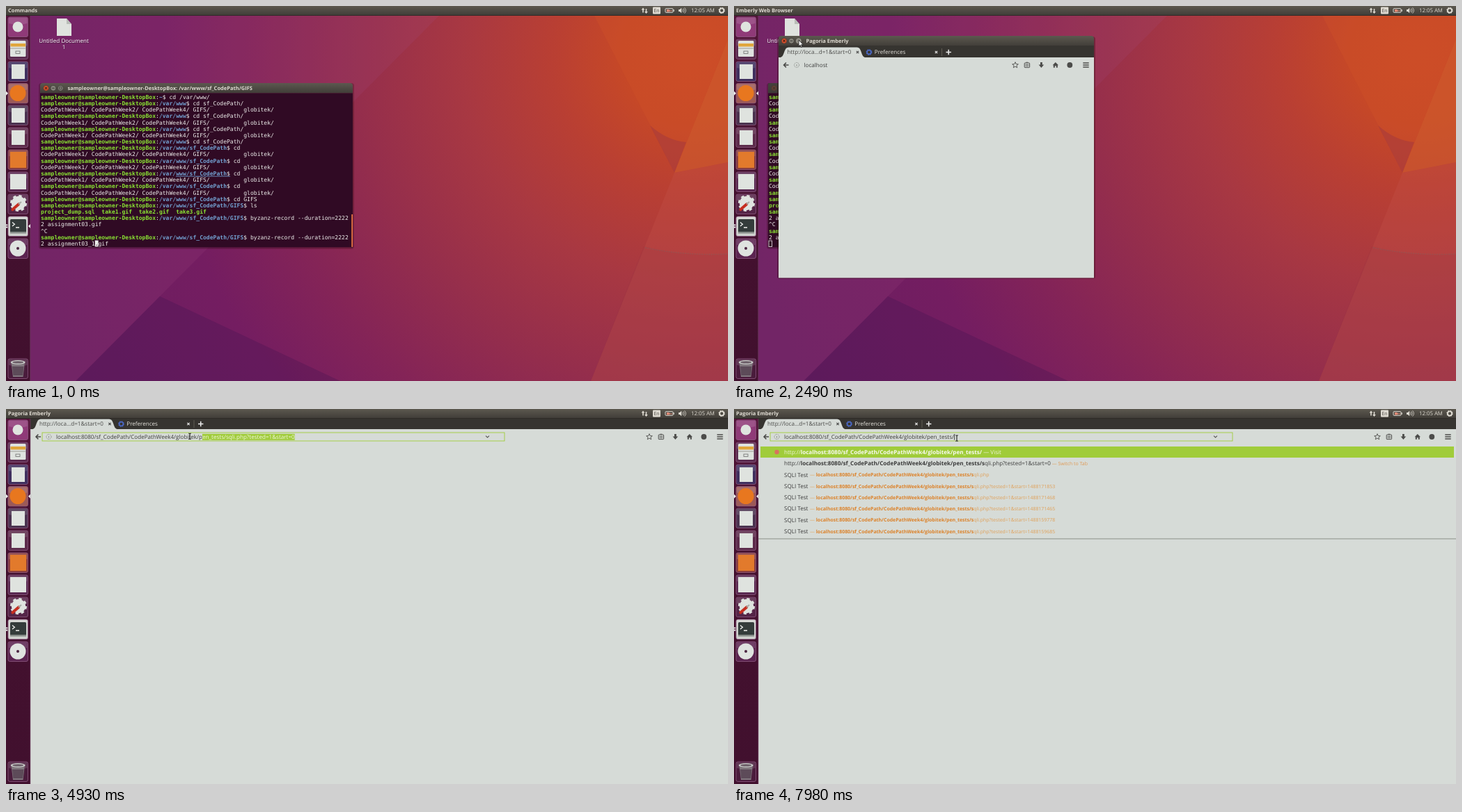
Write an HTML page that moves like this. It is 1037x540 px and loops after 8 s.

```html
<!DOCTYPE html>
<html lang="en">
<head>
<meta charset="utf-8">
<title>Desktop session</title>
<style>
html, body { margin: 0; width: 100%; height: 100%; overflow: hidden; background: #42102f; }
svg { display: block; width: 1037px; height: 540px; }
text { font: 8.08px "Open Sans", "Noto Sans", sans-serif; white-space: pre; text-rendering: geometricPrecision; }
.mono { font: 8.07px "DejaVu Sans Mono", monospace; fill: #eeeeec; }
.b { font-weight: bold; }
.title { font-weight: bold; font-size: 7.5px; fill: #dfdbd2; }
.grn { fill: #8ae234; font-weight: bold; }
.blu { fill: #729fcf; font-weight: bold; }
.small { font-size: 6.93px; }
</style>
</head>
<body>
<svg id="stage" viewBox="0 0 1037 540" xmlns="http://www.w3.org/2000/svg"></svg>
<script>
const LOOP = 8000, COL = 4.858, ROW = 9.175;
const PAPER = '#d6dbd7', INK = '#3c3c3c', LIME = '#a0cc3a';
const OWNER = 'sampleowner', HOST = OWNER + '-DesktopBox';
const SITE = 'localhost:8080/sf_CodePath/CodePathWeek4/globitek/pen_tests/';
const PAGE = 'sqli.php?tested=1&start=0';
const URL_TEXT = SITE + PAGE;

// ---- drawing helpers
const esc = s => s.replace(/&/g, '&amp;').replace(/</g, '&lt;');
const rect = (x, y, w, h, fill, more = '') => `<rect x="${x}" y="${y}" width="${w}" height="${h}" fill="${fill}" ${more}/>`;
const disc = (x, y, r, fill, more = '') => `<circle cx="${x}" cy="${y}" r="${r}" fill="${fill}" ${more}/>`;
const shape = (d, fill, more = '') => `<path d="${d}" fill="${fill}" ${more}/>`;
const line = (d, color, w = 1, more = '') => `<path d="${d}" fill="none" stroke="${color}" stroke-width="${w}" ${more}/>`;
const label = (x, y, s, fill = INK, more = '') => `<text x="${x}" y="${y + 2.8}" fill="${fill}" ${more}>${esc(s)}</text>`;
const span = (s, more = '') => `<tspan ${more}>${esc(s)}</tspan>`;
const group = (id, body, more = '') => `<g id="${id}" ${more}>${body}</g>`;
const gradient = (id, stops, more) => {
  const kind = more.includes('r=') ? 'radialGradient' : 'linearGradient';
  return `<${kind} id="${id}" ${more}>` +
    stops.map(([o, c]) => `<stop offset="${o}" stop-color="${c}"/>`).join('') + `</${kind}>`;
};
const gear = (x, y, r, color) =>
  disc(x, y, r * .72, 'none', `stroke="${color}" stroke-width="${r * .42}"`) +
  disc(x, y, r * .9, 'none', `stroke="${color}" stroke-width="${r * .4}" stroke-dasharray="${r * .36} ${r * .347}"`);
const cross = (x, y, color) => line(`M${x - 1.7} ${y - 1.7}l3.4 3.4m0 -3.4l-3.4 3.4`, color, 1.1);

// ---- desktop
function wallpaper() {
  return rect(0, 0, 1037, 540, 'url(#wall)') +
    shape('M35 14H622L100 540H35Z', '#a04a86', 'opacity=".16"') +
    shape('M221 418L100 540H480Z', '#2f1048', 'opacity=".22"') +
    shape('M845 14L960 240L1037 48V14Z', '#d2552a', 'opacity=".3"') +
    shape('M1037 48L960 240L1037 225Z', '#d2602f', 'opacity=".5"') +
    shape('M925 172Q950 194 977 196L960 240Z', '#8c2c4c', 'opacity=".32"') +
    shape('M960 240L1037 225V540H840Z', '#c05048', 'opacity=".34"') +
    shape('M916 346Q975 362 1037 357V540H840Z', '#8f3448', 'opacity=".16"') +
    line('M918 348Q975 360 1037 357', '#8d5a58', 1.6, 'stroke-dasharray="2 1.4" opacity=".55"') +
    shape('M73 18H87L94 26V43H73Z', '#dfe2de') + shape('M87 18V26H94Z', '#b9bdb8') +
    [['Untitled Document', 50], ['1', 59]].map(([s, y]) =>
      label(83.5, y + .7, s, '#2a0a26', 'text-anchor="middle" opacity=".7"') +
      label(83, y, s, '#fff', 'text-anchor="middle"')).join('');
}

function panel() {
  const c = '#dfdbd2';
  return rect(0, 0, 1037, 13.5, 'url(#bar)') + rect(0, 13, 1037, 1, '#2e2a27') +
    `<text id="app" class="title" x="3" y="9.2"></text>` +
    shape('M915 2.5l2.4 3h-1.6v4h-1.6v-4h-1.6zM919.5 11l2.4-3h-1.6v-4h-1.6v4h-1.6z', c) +
    rect(929, 1.5, 11, 10, c, 'rx="1"') + label(930.5, 6.5, 'En', '#4a4640', 'style="font-size:6.8px"') +
    rect(947, 3.7, 11, 5.6, 'none', `stroke="${c}" stroke-width="1" rx="1"`) + rect(958.4, 5.2, 1.4, 2.6, c) +
    shape('M949 5h3l2 1.5h3v1h-3l-2 1h-3z', '#e08a76') +
    shape('M966 5h1.8l2.4-2.2v7.4l-2.4-2.2h-1.8z', c) +
    line('M971.5 4.6q1.6 1.9 0 3.8M973 3.4q2.8 3.1 0 6.2M974.6 2.4q3.8 4.1 0 8.2', c, .8) +
    label(984, 6.5, '12:05 AM', c, 'style="font-size:7.8px"') + gear(1028, 6.5, 4.2, c);
}

const tile = (y, fill, body) =>
  rect(3, y - 14, 28.5, 28.5, fill, 'rx="2.5" stroke="#8d5a80" stroke-width=".8"') +
  shape(`M4 ${y - 13}H30.5V${y - 5}Q17 ${y - 1} 4 ${y - 5}Z`, '#fff', 'opacity=".13"') + body;

function launcher() {
  const w = '#dfe3df';
  const page = y => rect(8, y - 10, 19, 21, w);
  return rect(0, 14, 35, 526, 'url(#dock)') + rect(34.4, 14, .8, 526, '#6b3a5c') +
    tile(30, '#8f3a78', disc(17, 30, 7.5, w)) +
    tile(62, '#5b2c50', rect(6, 50, 22.5, 23, w, 'rx="1.5"') + rect(6.5, 54, 21.5, 4.5, '#e0a63c') +
      line('M6 61H28.5', '#8a8a84', .8) + rect(14, 65, 6, 3.4, 'none', 'stroke="#777" stroke-width=".9"')) +
    tile(94, '#40305f', page(94)) +
    tile(125.5, '#9c5a58', disc(17, 125.5, 11.5, '#e8771f')) +
    tile(157, '#4b3350', page(157)) +
    tile(189, '#5d2c4c', page(189)) +
    tile(221, '#8a3f3e', rect(6, 210, 23, 23, '#e27a2c')) +
    tile(253, '#5a2a52', rect(6, 242, 23, 22, w)) +
    tile(285, '#552548', disc(18, 284, 7, w) + gear(18, 284, 11, w) +
      line('M9.5 293L18 285.5', '#c62e20', 4.2, 'stroke-linecap="round"') +
      line('M18 285.5l4-3.5', '#a9aaa6', 2)) +
    tile(317, '#cfd2ce', rect(6, 307, 23, 20, '#343c3b', 'rx="1.5"') +
      rect(6, 325, 23, 2.5, '#858b87') + line('M9 311.5l3.4 2.8l-3.4 2.8M14 319H19', '#f2f2f0', 1.3)) +
    tile(349, '#5b2450', disc(17, 349, 11.5, w) + disc(17, 349, 2, '#4a2440')) +
    tile(522, '#4a1c3c', shape('M7.5 513H27L24.5 534H10Z', '#82787f') + shape('M9 519H25.5L24.2 532H10.4Z', '#5d4b59') +
      `<ellipse cx="17.2" cy="513" rx="10.5" ry="3" fill="#cdd0cc"/>` +
      `<ellipse cx="17.2" cy="513" rx="8" ry="1.7" fill="#6d5f69"/>`) +
    shape('M0 122.7L3 125.7L0 128.7Z', '#eee') +
    shape('M0 314.5h2.4v1.8H0zM0 317.6h2.4v1.8H0z', '#eee') +
    `<path id="active" fill="#eee"/>`;
}

const buttons = (x, y) => disc(x, y, 4, '#e0542f', 'stroke="#3a3733" stroke-width=".8"') + cross(x, y, '#5f2312') +
  [10.4, 20.8].map(d => disc(x + d, y, 4, '#85837a', 'stroke="#3a3733" stroke-width=".8"')).join('') +
  line(`M${x + 8.6} ${y}h3.6`, '#3c3b37', 1) +
  rect(x + 19.2, y - 1.6, 3.2, 3.2, 'none', 'stroke="#3c3b37" stroke-width=".8"');

// ---- console window
function consoleRows() {
  const www = '/var/www', site = www + '/sf_CodePath', gifs = site + '/GIFS';
  const prompt = (dir, cmd) => span(`${OWNER}@${HOST}`, 'class="grn"') + span(':') + span(dir, 'class="blu"') + span('$ ' + cmd);
  const names = span('CodePathWeek1/ CodePathWeek2/ CodePathWeek4/ GIFS/          globitek/');
  const up = prompt(www, 'cd sf_CodePath/'), cd = prompt(site, 'cd');
  const rec = prompt(gifs, 'byzanz-record --duration=2222');
  return [prompt('~', 'cd /var/www/'), up, names, up, names, up, names, up,
    cd, names, cd, names, cd, names, cd, names, prompt(site, 'cd GIFS'), prompt(gifs, 'ls'),
    span('project_dump.sql  take1.gif  take2.gif  take3.gif', 'class="grn"'),
    rec, span('2 assignment03.gif'), span('^C'), rec, span('2 assignment03_1.gif')];
}

function consoleWindow() {
  const rows = consoleRows().map((r, i) =>
    `<text class="mono" x="50" y="${(133.9 + i * ROW).toFixed(2)}">${r}</text>`).join('');
  const cx = 50 + 16 * COL;
  return rect(47, 111, 453, 239, '#200', 'opacity=".25" rx="4"') +
    shape('M49 125.5V115Q49 111 53 111H494Q498 111 498 115V125.5Z', 'url(#bar)') +
    buttons(57.5, 118.3) + label(88.5, 118.3, `${OWNER}@${HOST}: /var/www/sf_CodePath/GIFS`, '#dfdbd2', 'class="title"') +
    group('dim', rect(49, 111, 449, 14.5, '#3c3a36', 'opacity=".75"')) +
    rect(49, 125.5, 449, 222, '#300a24') + rect(496.2, 300, 1.8, 47, '#e0703f') +
    `<g clip-path="url(#view)">` + group('rows', rows) + '</g>' +
    group('typed', rect(cx, 337.5, COL, 9, '#eeeeec') +
      `<text class="mono" x="${cx}" y="344.9" style="fill:#300a24">.</text>` + line('M244 245.3H322', '#729fcf', .8)) +
    rect(50, 338, 4.4, 8.6, '#eeeeec', 'id="block" stroke="#eeeeec" stroke-width=".8"');
}

// ---- browser window, laid out for the maximised position
function browser() {
  const frame = rect(62, 44, 457, 349, '#200', 'opacity=".3" rx="4"') +
    shape('M64 58V47Q64 43 68 43H513Q517 43 517 47V58Z', 'url(#bar)') + buttons(72, 50.2) +
    disc(92.8, 50.2, 4, '#b5b3a8', 'id="hot" opacity=".5"') +
    label(103.5, 50.2, 'Pagoria Emberly', '#dfdbd2', 'class="title"');
  const left = shape('M37 29.2C45 29.2 42 14.5 50 14.5H148C156 14.5 153 29.2 161 29.2Z', PAPER) +
    label(48, 21.3, 'http://loca…d=1&start=0', '#4a4a48') + cross(149, 21.5, '#444') +
    gear(165.5, 21.5, 4, '#4a66c0') + label(173.3, 21.3, 'Preferences', '#e4e2dc') + cross(262, 21.5, '#eee') +
    line('M270 16V27', '#6a675f', .8) + line('M276 21.5h7.4M279.7 17.8v7.4', '#eee', 1.5) +
    line('M50 40H43.4M46.4 36.6L43 40L46.4 43.4', '#4a4a48', 1.5) +
    disc(61.5, 40, 3.5, 'none', 'stroke="#8a8d88" stroke-width=".9" stroke-dasharray="1.6 .9"') + rect(61, 39, 1, 2.6, '#8a8d88') +
    group('focus', rect(52, 34, 664, 12, 'none', `stroke="${LIME}" stroke-width=".9"`) +
      line('M689 38.6l2.5 2.3l2.5-2.3', '#555', 1.1)) +
    rect(0, 35.8, 0, 9, LIME, 'id="sel"') +
    `<text id="url" x="72" y="42.9" fill="${INK}"><tspan id="head"></tspan><tspan id="tail" fill="#f4f8e6"></tspan></text>` +
    rect(0, 36, .8, 8.6, '#222', 'id="caret"');
  const dark = '#4c4c4a';
  const right = shape('M924 35.7l1.2 2.9 3.1.2-2.4 2 .8 3-2.7-1.7-2.7 1.7.8-3-2.4-2 3.1-.2z', 'none', `stroke="${dark}" stroke-width=".9"`) +
    rect(937.2, 37, 7.4, 6.6, 'none', `stroke="${dark}" stroke-width="1" rx=".8"`) +
    line('M939.4 36.2h3M938.5 39.4h4.8M938.5 41.4h4.8', dark, .9) +
    shape('M960 36h2.8v3.4h2.4L961.4 44l-3.8-4.6h2.4z', dark) +
    shape('M977.6 40.3l4.2-4.2 4.2 4.2h-1.2v3.5h-2v-2.5h-2v2.5h-2v-3.5z', dark) +
    disc(1002.3, 40, 3.9, dark) + line('M1021.3 37h8.4M1021.3 40h8.4M1021.3 43h8.4', dark, 1.6);
  return group('frame', frame) + rect(0, 0, 0, 0, '#363430', 'id="strip"') + rect(0, 0, 0, 0, PAPER, 'id="page"') +
    group('left', left) + group('right', right);
}

function popup() {
  const rowY = i => 62.3 + i * 16.25;
  const stamps = [, 1488171853, 1488171468, 1488171465, 1488159778, 1488159685];
  const visits = Array.from({ length: 6 }, (_, i) => {
    const query = i ? '?tested=1&start=' + stamps[i] : '';
    const body = label(72, rowY(i + 2), 'SQLI Test') +
      `<text class="small" x="109" y="${rowY(i + 2) + 2.6}" fill="#e0a058">— ` +
      span(SITE + 's', 'class="b small" fill="#dc8128"') + span('qli.php' + query) + '</text>';
    return i < 4 ? body : group('late' + i, body);
  }).join('');
  return rect(35, 49, 1002, 0, PAPER, 'id="sheet"') + rect(35, 0, 1002, .9, '#83877f', 'id="edge"') +
    rect(38, 54, 996, 16, LIME) + disc(61.5, 62, 3.2, '#d8735e') +
    `<text x="72" y="65.1" fill="#eef3dc">http://<tspan id="visit" class="b" fill="#f8faf0"></tspan> — Visit</text>` +
    `<text x="72" y="81.4" fill="${INK}">http://` + span(SITE + 's', 'class="b"') + span(PAGE.slice(1)) +
    span(' — Switch to Tab', 'class="small" fill="#e09a55"') + '</text>' + visits;
}

const stage = document.getElementById('stage');
stage.innerHTML = '<defs>' +
  gradient('wall', [[0, '#ca4a27'], [.1, '#c64827'], [.2, '#b93f33'], [.33, '#a83842'], [.48, '#952e4c'],
    [.62, '#842457'], [.76, '#741d61'], [1, '#691e60']], 'gradientUnits="userSpaceOnUse" cx="985" cy="70" r="1000"') +
  gradient('bar', [[0, '#5c584f'], [1, '#403d38']], 'x1="0" y1="0" x2="0" y2="1"') +
  gradient('dock', [[0, '#54143a'], [.25, '#45112f'], [1, '#41102e']], 'x1="0" y1="0" x2="0" y2="1"') +
  '<clipPath id="view"><rect x="49" y="126" width="449" height="221"/></clipPath></defs>' +
  wallpaper() + group('console', consoleWindow()) + group('browser', browser()) + group('popup', popup()) +
  launcher() + panel() +
  group('arrow', shape('M0 0V9.2L2.1 7.3L3.6 10.6L5 10L3.6 6.8H6.4Z', '#f4f4f2', 'stroke="#1c1c1c" stroke-width=".8"')) +
  group('beam', line('M-1.8 -4.2Q0 -4.2 0 -3.2Q0 -4.2 1.8 -4.2M0 -3.4V3.4M-1.8 4.2Q0 4.2 0 3.2Q0 4.2 1.8 4.2', '#222', 1.1));

// ---- timeline
const el = {};
stage.querySelectorAll('[id]').forEach(n => el[n.id] = n);
const set = (n, a) => { for (const k in a) n.setAttribute(k, a[k]); };
const show = (n, on) => n.setAttribute('visibility', on ? 'inherit' : 'hidden');
const move = (n, x, y) => n.setAttribute('transform', `translate(${x} ${y})`);
const box = (n, x, y, width, height) => set(n, { x, y, width, height });

const pointerKeys = [[50, 285, 239], [550, 17, 122], [1000, 17, 122], [1400, 471, 84], [1790, 278, 77], [1870, 278, 77],
  [2450, 93, 49], [2780, 93, 48.5], [3550, 438, 40], [4050, 438, 40], [4210, 456, 40], [4410, 456, 40],
  [4930, 264, 39.3], [5060, 261, 39.5], [5240, 261, 39.5], [5580, 278, 39.5], [5750, 278, 39.5], [5950, 313, 39],
  [6170, 313, 39], [6510, 319.5, 40.8], [7809, 319.5, 40.8], [7810, 320, 42]];
const pickKeys = [[4410, 85], [4930, 51], [5060, 47], [5240, 47], [5580, 50], [5750, 50], [5950, 59], [6170, 59], [6510, 61]];

function at(keys, t) {
  const i = keys.findIndex(k => k[0] > t);
  if (i === 0) return keys[0].slice(1);
  if (i < 0) return keys[keys.length - 1].slice(1);
  const a = keys[i - 1], b = keys[i], u = (t - a[0]) / (b[0] - a[0]);
  const e = u * u * (3 - 2 * u) * .5 + u * .5;
  return a.slice(1).map((v, j) => v + (b[j + 1] - v) * e);
}

function drawAddress(t) {
  const focused = t >= 3650, pick = Math.round(at(pickKeys, t)[0]);
  let head = 'localhost', tail = '';
  if (focused && t < 7360) { head = URL_TEXT.slice(0, pick); tail = URL_TEXT.slice(pick); }
  if (t >= 7360) head = SITE + (t < 7810 ? 's' : '');
  el.head.textContent = head;
  el.tail.textContent = tail;
  const w = el.head.getComputedTextLength();
  set(el.sel, { x: 72 + w, width: tail ? el.tail.getComputedTextLength() : 0 });
  set(el.caret, { x: 72.3 + w });
  show(el.caret, focused && !tail);
  show(el.focus, focused);
}

function render(t) {
  const entered = t >= 50, open = t >= 740, active = t >= 850, full = t >= 2780;
  el.app.textContent = full ? 'Pagoria Emberly' : active ? 'Emberly Web Browser' : 'Commands';
  const y = active ? 125.7 : 317;
  set(el.active, { d: `M35 ${y - 3}L32 ${y}L35 ${y + 3}Z` });

  show(el.console, !full);
  move(el.rows, 0, entered ? -ROW : 0);
  show(el.typed, !entered);
  show(el.block, entered);
  set(el.block, { 'fill-opacity': open ? 0 : 1 });
  show(el.dim, open);

  show(el.browser, open);
  set(el.browser, { opacity: t < 790 ? .6 : 1 });
  show(el.frame, !full);
  show(el.hot, t >= 2400);
  if (full) {
    box(el.strip, 35, 13.5, 1002, 15.7);
    box(el.page, 35, 29, 1002, 511);
  } else {
    box(el.strip, 64, 57, 453, 17.2);
    box(el.page, 64, 74, 453, 317.5);
  }
  move(el.left, full ? 0 : 28.5, full ? 0 : 45);
  move(el.right, full ? 0 : -520, full ? 0 : 45);
  if (open) drawAddress(t);
  if (!open) [el.focus, el.caret].forEach(n => show(n, false));

  const all = t >= 7980, bottom = all ? 187 : 164;
  show(el.popup, t >= 7360);
  set(el.sheet, { height: bottom - 49 });
  set(el.edge, { y: bottom - .5 });
  el.visit.textContent = SITE + (all ? '' : 's');
  show(el.late4, t >= 7980);
  show(el.late5, t >= 7980);
  if (t < 7360) [el.late4, el.late5].forEach(n => show(n, false));

  const [px, py] = at(pointerKeys, t);
  const inField = full && py < 46.5;
  show(el.arrow, entered && !inField);
  show(el.beam, inField);
  move(inField ? el.beam : el.arrow, px, py);
}

const start = performance.now();
function tick(now) {
  render(Math.max(0, now - start) % LOOP);
  requestAnimationFrame(tick);
}
render(0);
requestAnimationFrame(tick);
</script>
</body>
</html>
```
